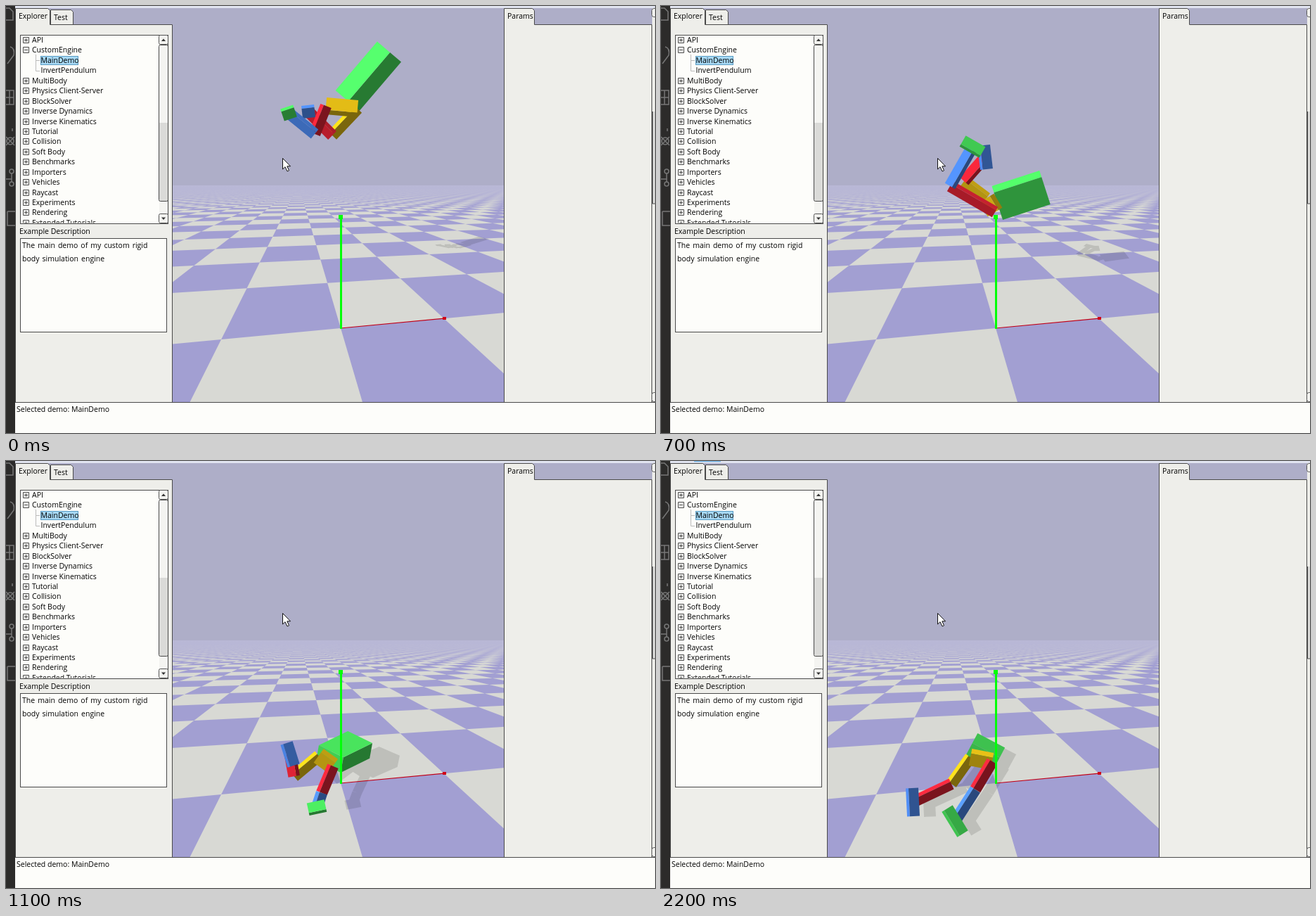
Recreate the animation shown at these times as an HTML page with a canvas. Size 923x607 px, loop 2.4 s.

```html
<!DOCTYPE html>
<html lang="en">
<head>
<meta charset="utf-8">
<title>Rigid body demo</title>
<style>
  html, body { margin: 0; width: 100%; height: 100%; overflow: hidden; background: #eeeeea; }
  canvas, svg { position: absolute; left: 0; top: 0; width: 923px; height: 607px; }
  text { font: 10.5px "Open Sans", "Noto Sans", sans-serif; fill: #000; white-space: pre; }
  .panel { fill: #eeeeea; }
  .line { fill: none; stroke: #4a4a4a; }
  .tab { fill: #eeeeea; stroke: #4a4a4a; }
  .icon { fill: none; stroke: #777; stroke-width: 1.5; }
  .box { fill: #fdfdfa; stroke: #4a4a4a; }
  .knob { fill: #f2f2ef; stroke: #555; }
  .dots { fill: none; stroke: #bbb; }
  .wide { word-spacing: 1.3px; }
  #glow { animation: glow 2400ms step-end infinite; }
  @keyframes glow { 0% { opacity: 0; } 87.5% { opacity: 1; } }
</style>
</head>
<body>
<canvas id="view" width="923" height="607"></canvas>
<svg viewBox="0 0 923 607">
  <defs><clipPath id="treeClip"><rect x="20" y="41" width="197" height="267.5"/></clipPath></defs>

  <rect width="923" height="3" fill="#e1e4f0"/>
  <rect id="glow" x="47" width="38" height="1.3" fill="#6fb2e4"/>
  <rect class="panel" x="13" y="26" width="224" height="537"/>
  <rect class="panel" x="708" y="26" width="215" height="537"/>
  <rect class="panel" x="919" y="3" width="4" height="23"/>
  <rect x="13" y="563" width="910" height="44" fill="#fdfdfa"/>
  <rect width="13" height="607" fill="#2c2b2a"/>
  <g class="icon">
    <path d="M0 3H5L10 8V20H0"/>
    <path d="M2 82L8 74M6 58Q13 60 11 70L8 74"/>
    <path d="M0 120H11V140H0M0 130H11M5 120V140"/>
    <circle cx="6" cy="192" r="5"/><path d="M0 186L12 198M0 198L12 186M9 178V174"/>
    <circle cx="8" cy="235" r="3"/><circle cx="8" cy="253" r="3"/><path d="M8 238V250M0 246H8"/>
    <path d="M2 292H13M2 292V312H13"/>
  </g>

  <path class="tab" d="M63.5 26.5V5.5H92.5L95.5 8.5V26.5"/>
  <path class="tab" d="M13.5 563V3.5H59.5L62.5 6.5V26.5H236.5V563"/>
  <path class="tab" d="M708.5 563V3.5H748.5L751.5 6.5V26.5H918.5V563"/>
  <path class="line" d="M13 563.5H923"/>
  <rect class="box" x="20.5" y="41.5" width="210" height="268"/>
  <rect class="box" x="20.5" y="330.5" width="208" height="133"/>

  <rect x="218" y="42" width="12" height="267" fill="#f4f4f1"/>
  <rect x="218" y="166" width="12" height="111" fill="#dadad8"/>
  <rect class="line" x="217.5" y="55.5" width="13" height="222" rx="2"/>
  <rect class="knob" x="217.5" y="41.5" width="13" height="13" rx="2"/>
  <rect class="knob" x="217.5" y="295.5" width="13" height="13" rx="2"/>
  <path d="M221 50L224 46.5L227 50ZM221 300.5L224 304L227 300.5Z" fill="#333"/>

  <rect x="919" y="150" width="4" height="131" fill="#d8d8d6"/>
  <path class="line" d="M919.5 150V281H923"/>
  <rect class="knob" x="918.5" y="3.5" width="13" height="12" rx="3"/>
  <rect class="knob" x="918.5" y="549.5" width="13" height="13" rx="3"/>

  <g id="tree" clip-path="url(#treeClip)">
    <path class="dots" d="M42.5 69V92.5H48M42.5 77.5H48"/>
    <rect x="49.5" y="71.5" width="53" height="12" fill="#a6d8f4" stroke="#5c9dc4"/>
  </g>
  <text x="18" y="18">Explorer</text>
  <text x="68" y="20">Test</text>
  <text x="713" y="18">Params</text>
  <text x="19" y="324">Example Description</text>
  <text class="wide" x="23" y="344">The main demo of my custom rigid</text>
  <text class="wide" x="23" y="363">body simulation engine</text>
  <text x="15" y="577">Selected demo: MainDemo</text>
  <path d="M393.5 216.5V232L397 228.7L400 235L402.5 233.8L399.8 227.8H404.5Z" fill="#fff" stroke="#111"/>
</svg>

<script>
const LOOP = 2400, STEP = 100;
const ctx = document.getElementById('view').getContext('2d');

// Explorer tree
const addToTree = (name, attrs, text = '') => {
  const node = document.createElementNS('http://www.w3.org/2000/svg', name);
  for (const k in attrs) node.setAttribute(k, attrs[k]);
  node.textContent = text;
  document.getElementById('tree').append(node);
};
['API', 'CustomEngine', 'MainDemo', 'InvertPendulum', 'MultiBody', 'Physics Client-Server',
 'BlockSolver', 'Inverse Dynamics', 'Inverse Kinematics', 'Tutorial', 'Collision', 'Soft Body',
 'Benchmarks', 'Importers', 'Vehicles', 'Raycast', 'Experiments', 'Rendering', 'Extended Tutorials',
].forEach((label, i) => {
  const y = 48 + i * 14.44, leaf = i === 2 || i === 3;
  addToTree('text', { x: leaf ? 49.5 : 37, y: Math.round(y + 4) }, label);
  if (leaf) return;
  const m = Math.round(y) + 0.5;
  addToTree('path', {
    class: 'line',
    d: `M24.5 ${m - 4}h8v8h-8zM26 ${m}h5` + (i === 1 ? '' : `M28.5 ${m - 2.5}v5`)
  });
});

const trace = (c, pts) => {
  pts.forEach(([x, y], i) => i ? c.lineTo(x, y) : c.moveTo(x, y));
  c.closePath();
};
function fillPoly(c, pts, color) {
  c.fillStyle = color;
  c.beginPath();
  trace(c, pts);
  c.fill();
}

// Ground plane in perspective: x runs right, z runs away from the viewer
function project(x, z) {
  const a = 0.0728 * x, b = 0.46 * z, w = 1 + a + b;
  return [(476 + 2640 * a + 416 * b) / w, (458 + 254.3 * (a + b)) / w, w];
}

function makeGround() {
  const cv = document.createElement('canvas');
  cv.width = 923;
  cv.height = 607;
  const c = cv.getContext('2d');
  c.fillStyle = '#aeaec8';
  c.fillRect(0, 0, 923, 607);
  c.fillStyle = '#a29fd2';
  c.fillRect(0, 255, 923, 352);
  for (let z = -1; z < 70; z++) {
    for (let x = -34; x < 80; x++) {
      if ((x + z) & 1) continue;
      const tile = [project(x, z), project(x + 1, z), project(x + 1, z + 1), project(x, z + 1)];
      if (tile.every(p => p[2] > 0.05)) fillPoly(c, tile, '#d8d9d4');
    }
  }
  const haze = c.createLinearGradient(0, 255, 0, 290);
  haze.addColorStop(0, 'rgba(185,184,214,1)');
  haze.addColorStop(0.25, 'rgba(185,184,214,.9)');
  haze.addColorStop(1, 'rgba(185,184,214,0)');
  c.fillStyle = haze;
  c.fillRect(0, 255, 923, 35);
  return cv;
}
const ground = makeGround();

// Joint positions on screen; roll turns the chest, cast is how far the shadow lies from the hips
const landed = {
  t: 1300, roll: [0], cast: [18, 8], head: [469, 404],
  hipL: [440, 421], kneeL: [413, 459], ankleL: [358, 485], toeL: [359, 505],
  hipR: [471, 427], kneeR: [447, 467], ankleR: [418, 512], toeR: [429, 530]
};
const poses = [
  { t: 200, roll: [1], cast: [172, 195], head: [545, 65],
    hipL: [500, 146], kneeL: [464, 184], ankleL: [430, 150], toeL: [421, 151],
    hipR: [455, 142], kneeR: [439, 182], ankleR: [402, 152], toeR: [393, 155] },
  { t: 500, roll: [0.25], cast: [170, 147], head: [551, 154],
    hipL: [484, 188], kneeL: [440, 192], ankleL: [453, 149], toeL: [463, 151],
    hipR: [473, 209], kneeR: [418, 197], ankleR: [427, 135], toeR: [442, 128] },
  { t: 700, roll: [-0.4], cast: [154, 76], head: [546, 258],
    hipL: [463, 273], kneeL: [431, 249], ankleL: [461, 215], toeL: [463, 232],
    hipR: [475, 293], kneeR: [411, 256], ankleR: [443, 200], toeR: [457, 208] },
  { t: 1000, roll: [1.2], cast: [65, 13], head: [518, 403],
    hipL: [447, 418], kneeL: [408, 443], ankleL: [427, 383], toeL: [434, 397],
    hipR: [462, 437], kneeR: [450, 474], ankleR: [454, 483], toeR: [467, 470] },
  landed,
  { ...landed, t: 1700, head: [464, 408] }
];

const mix = (a, b, p) => a.map((v, i) => v + (b[i] - v) * p);

// Impacts slow down, free motion is even
function poseAt(t) {
  t = Math.min(Math.max(t, 200), 1700);
  const n = Math.max(1, poses.findIndex(k => k.t >= t)), from = poses[n - 1], to = poses[n];
  let p = (t - from.t) / (to.t - from.t);
  if (from.t === 700 || from === landed) p = 1 - (1 - p) ** 3;
  const pose = {};
  for (const k in from) if (k !== 't') pose[k] = mix(from[k], to[k], p);
  return pose;
}

const GREEN = [80, 250, 102], YELLOW = [255, 212, 25], RED = [250, 40, 60], BLUE = [85, 150, 260];
const LIGHT = [-0.6, -0.6, 0.3];

const dot = (a, b) => a[0] * b[0] + a[1] * b[1] + a[2] * b[2];
const scale = (a, k) => a.map(v => v * k);
const add = (...vs) => vs.reduce((a, b) => a.map((v, i) => v + b[i]));

// Visible faces of a box along p-q; one longer than p-q leans away from the viewer
function box(color, p, q, width, thick, roll = 0.6, length = 0) {
  const dx = q[0] - p[0], dy = q[1] - p[1], flat = Math.hypot(dx, dy) || 1;
  const full = Math.max(length, flat), dz = -Math.sqrt(full * full - flat * flat);
  const u = [dx / full, dy / full, dz / full];
  const side = [-dy / flat, dx / flat, 0];
  const front = [-u[2] * side[1], u[2] * side[0], flat / full];
  const cos = Math.cos(roll), sin = Math.sin(roll);
  const axes = [u, add(scale(side, cos), scale(front, sin)), add(scale(front, cos), scale(side, -sin))];
  const half = [full / 2, width / 2, thick / 2];
  const mid = [(p[0] + q[0]) / 2, (p[1] + q[1]) / 2, 0];
  const faces = [];
  for (let i = 0; i < 3; i++) {
    for (const sign of [1, -1]) {
      const normal = scale(axes[i], sign);
      if (normal[2] < 0.01) continue;
      const j = (i + 1) % 3, k = (i + 2) % 3;
      const a = scale(axes[j], half[j]), b = scale(axes[k], half[k] * sign);
      const c = add(mid, scale(normal, half[i]));
      const bright = Math.max(0.48, 0.6 + 0.55 * dot(normal, LIGHT));
      faces.push({
        pts: [[1, 1], [-1, 1], [-1, -1], [1, -1]].map(([m, n]) => add(c, scale(a, m), scale(b, n))),
        fill: `rgb(${color.map(v => Math.min(255, Math.round(v * bright)))})`
      });
    }
  }
  return faces;
}

const limb = (color, p, q) => box(color, p, q, 14, 9);
const foot = (color, ankle, toe) => box(color, mix(toe, ankle, 2), toe, 17, 7);

function bodyFaces(b, hips) {
  return [
    box(GREEN, mix(hips, b.head, 0.12), b.head, 44, 25, b.roll[0], 70),
    limb(YELLOW, b.hipL, b.kneeL),
    limb(RED, b.kneeL, b.ankleL),
    foot(BLUE, b.ankleL, b.toeL),
    box(YELLOW, b.hipL, b.hipR, 20, 14, -0.5),
    limb(RED, b.hipR, b.kneeR),
    limb(BLUE, b.kneeR, b.ankleR),
    foot(GREEN, b.ankleR, b.toeR)
  ].flat();
}

// The same outline, moved aside and flattened the farther it is cast
function drawShadow(faces, hips, [dx, dy]) {
  const far = dx / 172, kx = 1 - 0.55 * far, ky = 1 - 0.88 * far;
  ctx.beginPath();
  for (const f of faces) {
    trace(ctx, f.pts.map(([x, y]) =>
      [hips[0] + dx + (x - hips[0]) * kx, hips[1] + dy + (y - hips[1]) * ky]));
  }
  ctx.fillStyle = 'rgba(0,0,0,.12)';
  ctx.fill();
}

function drawAxes() {
  const [x, y] = project(1, 0);
  ctx.strokeStyle = '#c00018';
  ctx.lineWidth = 1.2;
  ctx.beginPath();
  ctx.moveTo(476, 458);
  ctx.lineTo(x, y);
  ctx.stroke();
  ctx.fillStyle = '#d00018';
  ctx.fillRect(621, 442, 5, 4);
  ctx.fillStyle = '#00ff08';
  ctx.fillRect(475, 300, 3, 159);
  ctx.fillRect(473, 297, 6, 6);
}

function draw(t) {
  const pose = poseAt(t), hips = mix(pose.hipL, pose.hipR, 0.5), faces = bodyFaces(pose, hips);
  ctx.drawImage(ground, 0, 0);
  drawShadow(faces, hips, pose.cast);
  // The body lands behind the upright axis
  if (t < 800) drawAxes();
  faces.forEach(f => fillPoly(ctx, f.pts, f.fill));
  if (t >= 800) drawAxes();
}

let shown = -1;
function tick() {
  const t = Math.floor(performance.now() % LOOP / STEP) * STEP;
  if (t !== shown) draw(shown = t);
  requestAnimationFrame(tick);
}
tick();
</script>
</body>
</html>
```
